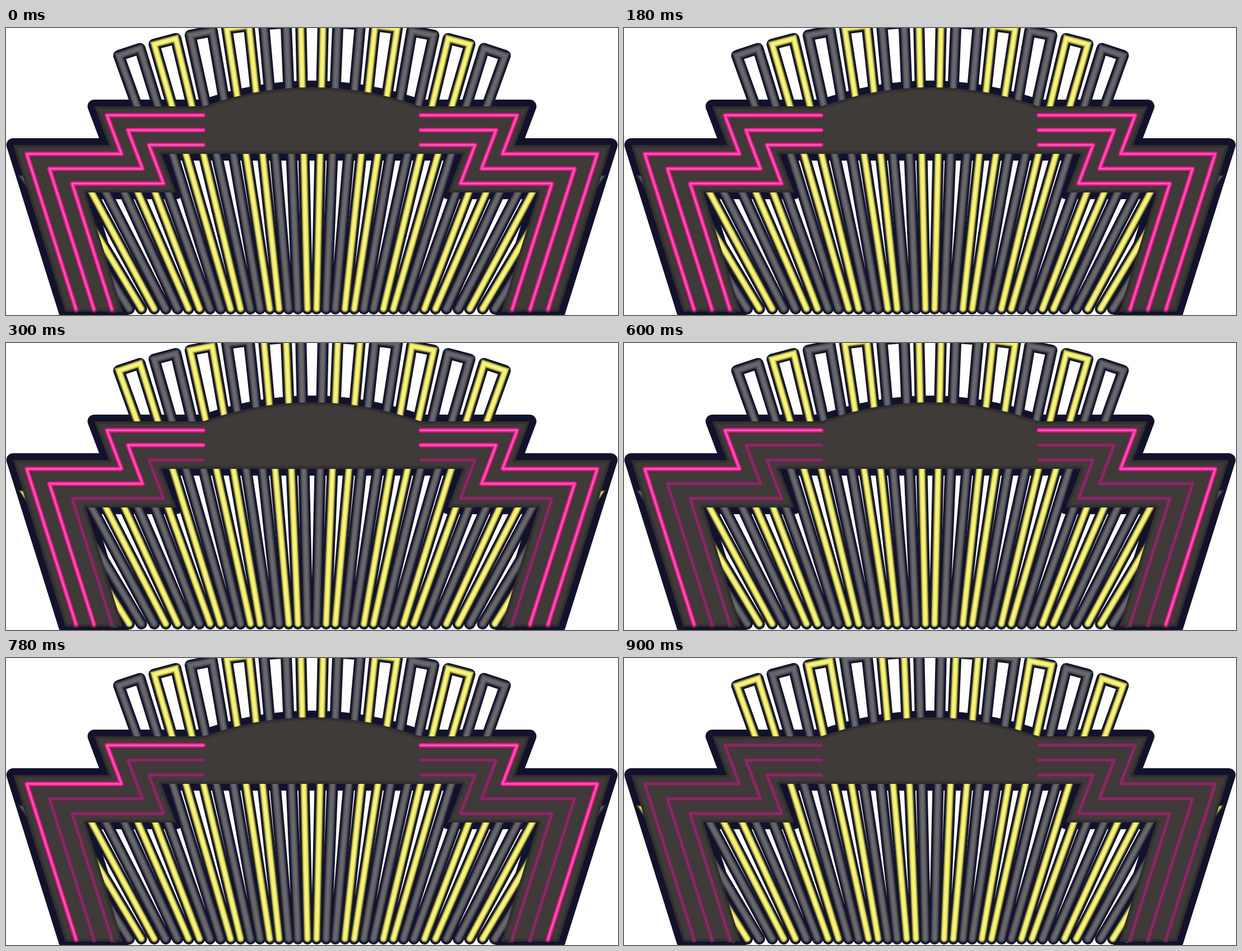
These frames come from a looping animation (1092 px wide and 513 px high, 1200 ms). An HTML page with a canvas:

```html
<!DOCTYPE html>
<html lang="en">
<head>
<meta charset="utf-8">
<title>Neon marquee</title>
<style>
  html, body { margin: 0; width: 100%; height: 100%; overflow: hidden; background: #fff; }
  canvas { display: block; }
</style>
</head>
<body>
<canvas width="1092" height="513"></canvas>
<script>
const ctx = document.querySelector('canvas').getContext('2d');
const W = 1092, H = 513, STEP = 300;
const NAVY = '#12122c', BROWN = '#3f3b38', SHADE = 'rgba(26, 24, 32, .16)';

// Tube looks: [stroke width, colour] from the rim to the highlight
const YELLOW = [[15, '#2a2a2e'], [12, '#74723a'], [10, '#bfbc48'], [7.5, '#e7e35f'], [4.5, '#f7f482']];
const GREY = [[15, '#232336'], [12, '#3e3e4b'], [10, '#515159'], [7, '#606065'], [4, '#69696c']];
const PINK = [[12, '#47323a'], [9, '#8a2160'], [7.5, '#d81f86'], [5, '#f0289a'], [2, '#ff66b8']];
const DIM = [[11, '#45363d'], [8.5, '#5c2a48'], [6.5, '#742856'], [3, '#842f62']];

const mirror = pts => pts.map(([x, y]) => [W - x, y]);

function trace(pts) {
  const path = new Path2D();
  pts.forEach(([x, y]) => path.lineTo(x, y));
  return path;
}

function stroke(path, width, color) {
  ctx.lineWidth = width;
  ctx.strokeStyle = color;
  ctx.stroke(path);
}

const tube = (path, layers) => layers.forEach(([width, color]) => stroke(path, width, color));

// A fan of flaring loops around a hub below the stage
const HUB = 1018, RIM = 1028, PITCH = 0.0645, FLARE = 0.023, INSET = 3.7;
const FOOT = 502, HIDDEN = 270, TALL = 5;

function loop(angle, tall) {
  const sin = Math.sin(angle), cos = Math.cos(angle);
  const at = (r, side) => {
    const w = side * (FLARE * r - INSET);
    return [W / 2 - r * sin + w * cos, HUB - r * cos - w * sin];
  };
  // Point where one leg crosses a given height
  const cross = (y, side) =>
    at((HUB - y + side * INSET * sin) / (cos + side * FLARE * sin), side);
  const leg = side => [cross(FOOT, side), tall ? at(RIM, side) : cross(HIDDEN, side)];
  return trace([...leg(-1), ...leg(1).reverse()]);
}

const loops = [];
for (let n = -9; n <= 9; n++) {
  loops.push({ path: loop(-n * PITCH, Math.abs(n) <= TALL), parity: Math.abs(n) % 2 });
}

// Nested zigzags; fractional levels give the edges of the sign body
function zigzag(level, foot = 503) {
  const drop = 26.5 * level, bend = 37.5 * level;
  return [
    [352, 156 + drop], [180 + bend, 156 + drop], [206 + bend, 225 + drop],
    [37 + 40.5 * level, 225 + drop], [125 + 32 * level, foot]
  ];
}
const zigzags = [0, 1, 2].map(zigzag_ => zigzag(zigzag_)).map(pts => [trace(pts), trace(mirror(pts))]);

const side = [...zigzag(-0.6, 507), ...zigzag(2.6, 507).reverse()];
const body = trace([...side, ...mirror(side).reverse()]);
body.quadraticCurveTo(W / 2, 72, ...side[0]);
body.closePath();

function drawBody() {
  ctx.fillStyle = BROWN;
  ctx.fill(body);
  ctx.save();
  ctx.clip(body);
  for (const width of [12, 8, 4]) stroke(body, width, SHADE);
  ctx.restore();
}

function draw(step) {
  ctx.fillStyle = '#fff';
  ctx.fillRect(0, 0, W, H);
  ctx.lineCap = ctx.lineJoin = 'round';
  stroke(body, 24, NAVY);
  loops.forEach(({ path }) => stroke(path, 20, NAVY));
  ctx.lineJoin = 'miter';
  loops.forEach(({ path, parity }) => tube(path, parity === step % 2 ? YELLOW : GREY));
  ctx.lineJoin = 'round';
  drawBody();
  zigzags.forEach((pair, i) => pair.forEach(path => tube(path, i < 3 - step ? PINK : DIM)));
}

function tick() {
  draw(Math.floor(performance.now() / STEP) % 4);
  requestAnimationFrame(tick);
}
tick();
</script>
</body>
</html>
```
